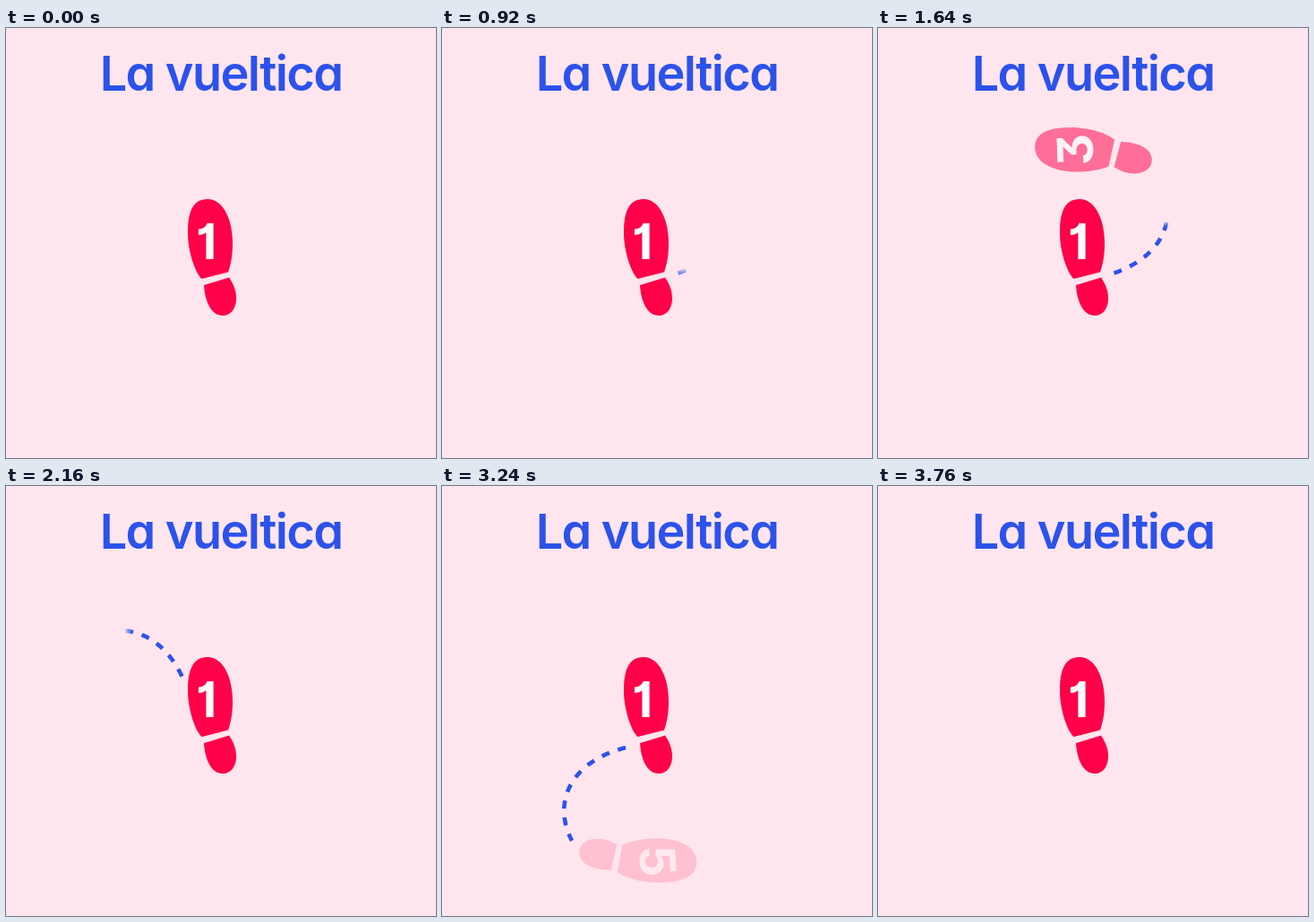
Recreate the animation shown at these times as an HTML page. Size 480 by 480 pixels, loop 4240 ms.

```html
<!DOCTYPE html>
<html lang="es">
<head>
<meta charset="utf-8">
<title>La vueltica</title>
<style>
  html, body { margin: 0; height: 100%; overflow: hidden; background: #ffe5ed; }
  svg { display: block; width: 100vw; height: 100vh; }
  text {
    font-family: Inter, Lato, sans-serif;
    font-feature-settings: "cv01", "cv02", "cv09", "cv11";
    text-anchor: middle;
  }
  .title { font-size: 54px; font-weight: 600; letter-spacing: -1.55px; fill: #2c52ec; }
  .digit { font-size: 55px; font-weight: 700; fill: #fff; }
  .sole { fill: #ff0049; }
  #arc { fill: none; stroke: url(#wipe); stroke-width: 4.6; stroke-dasharray: 9 10; }
</style>
</head>
<body>
<svg viewBox="0 0 480 480">
  <defs>
    <linearGradient id="wipe" gradientUnits="userSpaceOnUse">
      <stop offset="0" stop-color="#2c52ec"/>
      <stop offset="1" stop-color="#2c52ec" stop-opacity="0"/>
    </linearGradient>
    <!-- left sole, centred on the origin -->
    <path id="sole" d="M-11.5 24C-19 17-27 -7-27 -27C-27 -50-22 -65-5 -65C13 -65 23 -41 23 -16C23 -2 21 8 18 16.5Z
      M-9 31L19 22.5C24 30 27 37 27 46C27 57 21 65 12 65C-1 65-8 49-9 31Z"/>
  </defs>
  <text class="title" x="240" y="70">La vueltica</text>
  <use class="sole" href="#sole" x="230" y="256"/>
  <text class="digit" x="223.5" y="258">1</text>
  <path id="arc"/>
  <g id="step">
    <use id="foot" class="sole" href="#sole"/>
    <text id="digit" class="digit" y="20"></text>
  </g>
</svg>
<script>
const LOOP = 4240, WIPE = 250, FOOT_DELAY = 290, FOOT_FADE = 200, EXIT = 560, EXIT_TIME = 260, SOFT = 10;

// foot and label: [x, y, angle]; the arc is wiped along one axis between two positions
const steps = [
  { start: 20, foot: [394, 244, 0], label: [397, 222.5, 0], axis: 'x', from: 244, to: 384,
    arc: 'M248 331C268 366 360 372 380 320', offset: 4.5 },
  { start: 900, foot: [240.4, 137, -92], label: [220, 136, -92], axis: 'y', from: 278, to: 161,
    arc: 'M263.5 273.7C325 252 335 205 312 164', offset: 0 },
  { start: 2015, foot: [61.5, 245, 183], label: [55.5, 259.5, 3], axis: 'x', from: 200, to: 92,
    arc: 'M196.5 212.5C175 168 138 151 95 167.5', offset: 0 },
  { start: 2920, foot: [219, 417.5, 86], label: [241, 419, 86], axis: 'y', from: 287, to: 400,
    arc: 'M205 292C145 307 122 352 145 396', offset: 0 },
];

const [wipe, arc, step, foot, digit] =
  ['wipe', 'arc', 'step', 'foot', 'digit'].map(id => document.getElementById(id));
const clamp = v => Math.min(1, Math.max(0, v));
const place = ([x, y, angle]) => `translate(${x} ${y}) rotate(${angle})`;
const set = (el, attrs) => Object.entries(attrs).forEach(([k, v]) => el.setAttribute(k, v));
let current = -1;

function showStep(i) {
  const s = steps[i];
  set(arc, { d: s.arc, 'stroke-dashoffset': s.offset });
  set(foot, { transform: place(s.foot) + ' scale(-1 1)' });
  set(digit, { transform: place(s.label) });
  digit.textContent = i + 2;
  current = i;
}

function draw() {
  const now = performance.now() % LOOP;
  const i = Math.max(0, steps.findLastIndex(s => now >= s.start));
  if (i !== current) showStep(i);

  const { start, axis, from, to } = steps[i];
  const t = now - start;
  const stay = 1 - clamp((t - EXIT) / EXIT_TIME) ** 2;
  const drawn = clamp(t / WIPE) * stay;
  const soft = SOFT * Math.sign(to - from);
  const front = from - soft + (to - from + soft) * drawn;
  const other = axis === 'x' ? 'y' : 'x';
  set(wipe, { [axis + 1]: front, [axis + 2]: front + soft, [other + 1]: 0, [other + 2]: 0 });
  set(arc, { opacity: drawn > 0 ? 1 : 0 });
  set(step, { opacity: clamp((t - FOOT_DELAY) / FOOT_FADE) * stay });
  requestAnimationFrame(draw);
}
draw();
</script>
</body>
</html>
```
